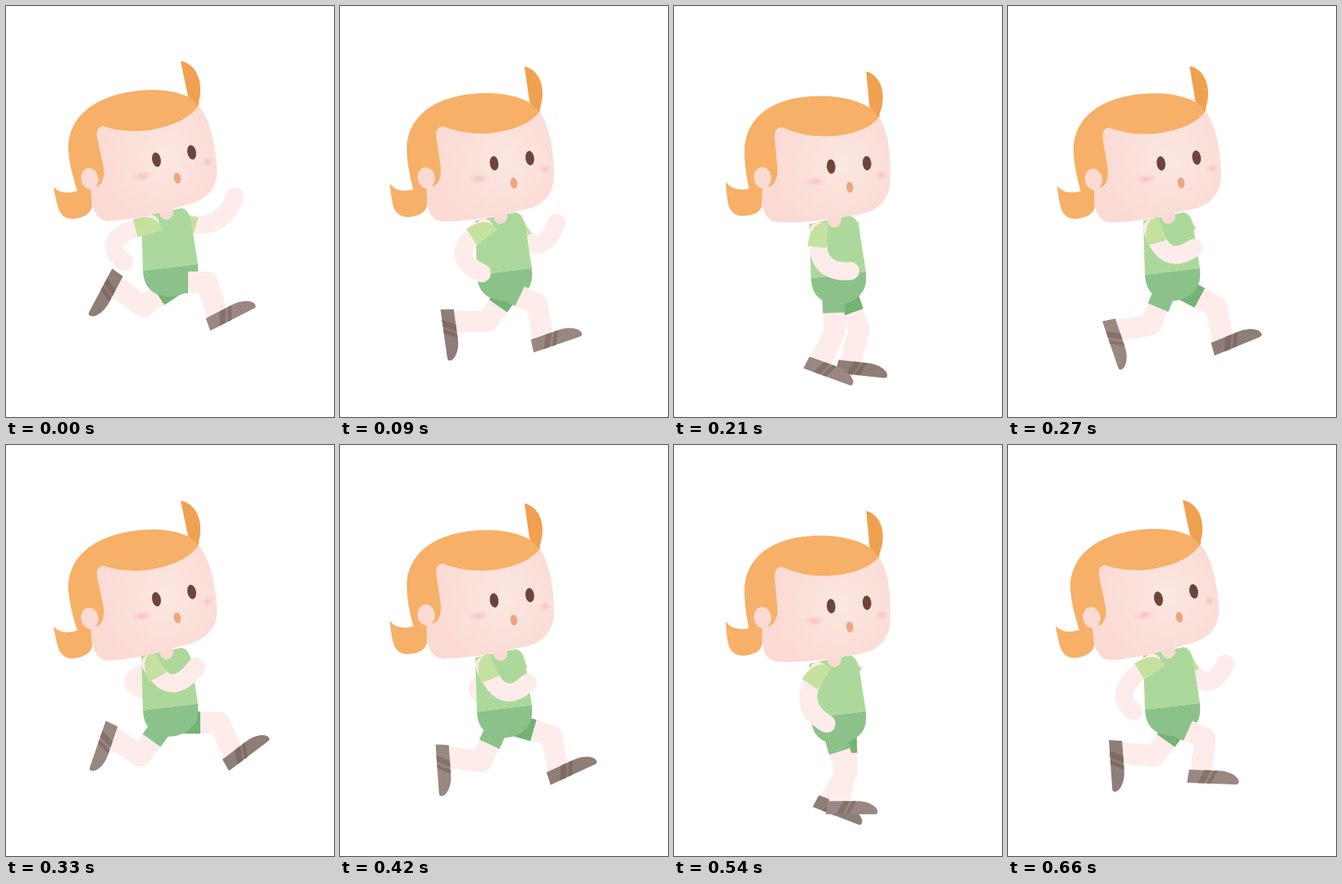
These frames come from a looping animation (400x500 px, 690 ms). An HTML page with a canvas:

```html
<!DOCTYPE html>
<html lang="en">
<head>
<meta charset="utf-8">
<title>Running child</title>
<style>
  html, body { margin: 0; width: 100%; height: 100%; overflow: hidden; background: #fff; }
  canvas { display: block; width: 400px; height: 500px; }
</style>
</head>
<body>
<canvas width="400" height="500"></canvas>
<script>
const ctx = document.querySelector('canvas').getContext('2d');
const STEP = 30, STEPS = 23, RAD = Math.PI / 180;
const SKIN = '#fdecea', FACE = '#fbdad4', HAIR = '#f6b067', SHIRT = '#acd99b',
      SLEEVE = '#c5e19f', SHORTS = '#8bc28a', SHORTS_FAR = '#74b374';

// Pose keys, in steps of the loop; limb values line up with POSES.
const POSES = [0, 3, 7, 11, 14, 18, 22];
const nearLeg = {
  hip: [194, 336], shorts: SHORTS, shoe: '#998781', stripe: '#87726b',
  thigh: [0, 25, 88, 126, 115, 73, 24],
  shin: [72, 80, 115, 213, 187, 100, 97],
  foot: [-27, -19, 20, 109, 86, 0, 2]
};
const farLeg = {
  hip: [209, 337], shorts: SHORTS_FAR, shoe: '#8f7d77', stripe: '#7f6b64',
  thigh: [146, 125, 71, 0, 16, 88, 126],
  shin: [217, 180, 105, 66, 79, 121, 185],
  foot: [118, 82, 6, -37, -25, 21, 86]
};
const nearArm = {
  shoulder: [176, 265], sleeve: 1,
  elbowX: [-68, -50, -6, 24, 20, -29, -54], elbowY: [17, 32, 52, 46, 53, 42, 34],
  handX: [-32, -3, 39, 56, 53, 10, -23], handY: [46, 55, 48, 4, 22, 64, 59]
};
const farArm = {
  shoulder: [216, 263], sleeve: 0.85,
  elbowX: [48, 28, 0, -91, -72, -40, 28], elbowY: [13, 46, 50, 20, 28, 45, 49],
  handX: [63, 48, 5, -46, -36, -10, 49], handY: [-31, -4, 45, 35, 43, 45, 3]
};

// Periodic monotone cubic through the keys.
function curve(step, times, values) {
  const n = times.length;
  const time = j => times[(j + n) % n] + STEPS * Math.floor(j / n);
  const value = j => values[(j + n) % n];
  const secant = j => (value(j + 1) - value(j)) / (time(j + 1) - time(j));
  const slope = j => {
    const a = secant(j - 1), b = secant(j);
    return a * b > 0 ? 2 * a * b / (a + b) : 0;
  };
  let i = n - 1;
  while (times[i] > step) i--;
  const span = time(i + 1) - time(i), u = (step - time(i)) / span, v = 1 - u;
  return value(i) * v * v * (1 + 2 * u) + value(i + 1) * u * u * (3 - 2 * u)
    + span * u * v * (slope(i) * v - slope(i + 1) * u);
}

function fill(path, color) {
  ctx.fillStyle = color;
  ctx.fill(new Path2D(path));
}

function ellipse(x, y, rx, ry, color, angle = -11) {
  ctx.fillStyle = color;
  ctx.beginPath();
  ctx.ellipse(x, y, rx, ry, angle * RAD, 0, 7);
  ctx.fill();
}

function stroke(path, color, width, cap = 'butt') {
  Object.assign(ctx, { strokeStyle: color, lineWidth: width, lineCap: cap, lineJoin: 'round' });
  ctx.stroke(new Path2D(path));
}

function placed(x, y, angle, draw) {
  ctx.save();
  ctx.translate(x, y);
  ctx.rotate(angle);
  draw();
  ctx.restore();
}

const along = ([x, y], angle, length) =>
  [x + length * Math.cos(angle * RAD), y + length * Math.sin(angle * RAD)];

function drawLeg(leg, step) {
  const [thigh, shin, foot] = [leg.thigh, leg.shin, leg.foot].map(v => curve(step, POSES, v));
  const knee = along(leg.hip, thigh, 51), ankle = along(knee, shin, 39);
  stroke(`M${along(leg.hip, thigh, 20)}L${knee}L${along(ankle, shin, 4)}`, SKIN, 26);
  stroke(`M${leg.hip}L${along(leg.hip, thigh, 28)}`, leg.shorts, 27);
  placed(...ankle, foot * RAD, () => {
    fill('M-15 0H22C36 0 48 8 46 14Q46 16 42 16H-17Z', leg.shoe);
    fill('M4 0h8l-8 16h-8zM15 0h5l-8 16h-5z', leg.stripe);
  });
}

function drawArm(arm, step) {
  const [ex, ey, hx, hy] = [arm.elbowX, arm.elbowY, arm.handX, arm.handY]
    .map(v => curve(step, POSES, v));
  placed(...arm.shoulder, 0, () => {
    stroke(`M0 0Q${ex} ${ey} ${hx} ${hy}`, SKIN, 22, 'round');
    ctx.rotate(Math.atan2(ey, ex));
    ctx.scale(arm.sleeve, arm.sleeve);
    fill('M19 11V-12L-12-11Q-12 11 19 11Z', SLEEVE);
  });
}

function blush(x, y, w, h) {
  placed(x, y, -11 * RAD, () => {
    ctx.scale(w, h);
    const glow = ctx.createRadialGradient(0, 0, 0, 0, 0, 1);
    glow.addColorStop(0, '#f8bfc4');
    glow.addColorStop(1, '#f8c8ca00');
    ctx.fillStyle = glow;
    ctx.fillRect(-1, -1, 2, 2);
  });
}

function drawHead() {
  const skin = ctx.createRadialGradient(195, 183, 8, 195, 183, 85);
  skin.addColorStop(0, '#fce6e0');
  skin.addColorStop(1, FACE);
  fill('M102 215Q103 262 125 261.5Q160 260 215 243.5C245 237 260 222 257 193Q252 140 234 120L118 145Q100 160 102 215Z', skin);
  fill('M58 220Q68 231 87 225Q77 195 76 175C75 125 125 102 182 102Q216 103 236 119Q222 143 175 151Q145 155 118 146Q109 149 111 160L119 197Q121 212 113 219L103 222L105 243Q104 254 88 258Q73 262 66 251Q62 244 58 220Z', HAIR);
  fill('M213 67C232 70 243 93 234 121Q227 114 222 110Z', '#efa150');
  ellipse(102, 210, 10.5, 13, FACE);
  blush(166, 207, 14, 6.5);
  blush(246, 190, 8, 6.5);
  ellipse(183.5, 187, 5.3, 8.8, '#6d4538');
  ellipse(226.5, 178, 5.3, 8.8, '#6d4538');
  ellipse(209, 209.5, 4.2, 6.6, '#eca57e');
}

function draw(step) {
  const bob = 10 * curve(step, [0, 6, 12, 18, 22], [0, 1, 0, 1, 0]);
  const nod = 7.2 * curve(step, [0, 6, 11, 17, 22], [0, 1, 0, 1, 0]);
  ctx.clearRect(0, 0, 400, 500);
  placed(0, bob, 0, () => {
    drawArm(farArm, step);
    drawLeg(farLeg, step);
    fill('M165 256L214 246Q223 247 226 263L234 314L167 322Z', SHIRT);
    fill('M167 322L234 314Q236 332 228 341Q218 353 200 354Q168 352 167 322Z', SHORTS);
    drawLeg(nearLeg, step);
    drawArm(nearArm, step);
    ellipse(195.5, 251, 8.5, 9, FACE);
    placed(196, 258, nod * RAD, () => {
      ctx.translate(-196, -258);
      drawHead();
    });
  });
}

function tick() {
  draw(Math.floor(performance.now() / STEP) % STEPS);
  requestAnimationFrame(tick);
}
tick();
</script>
</body>
</html>
```
